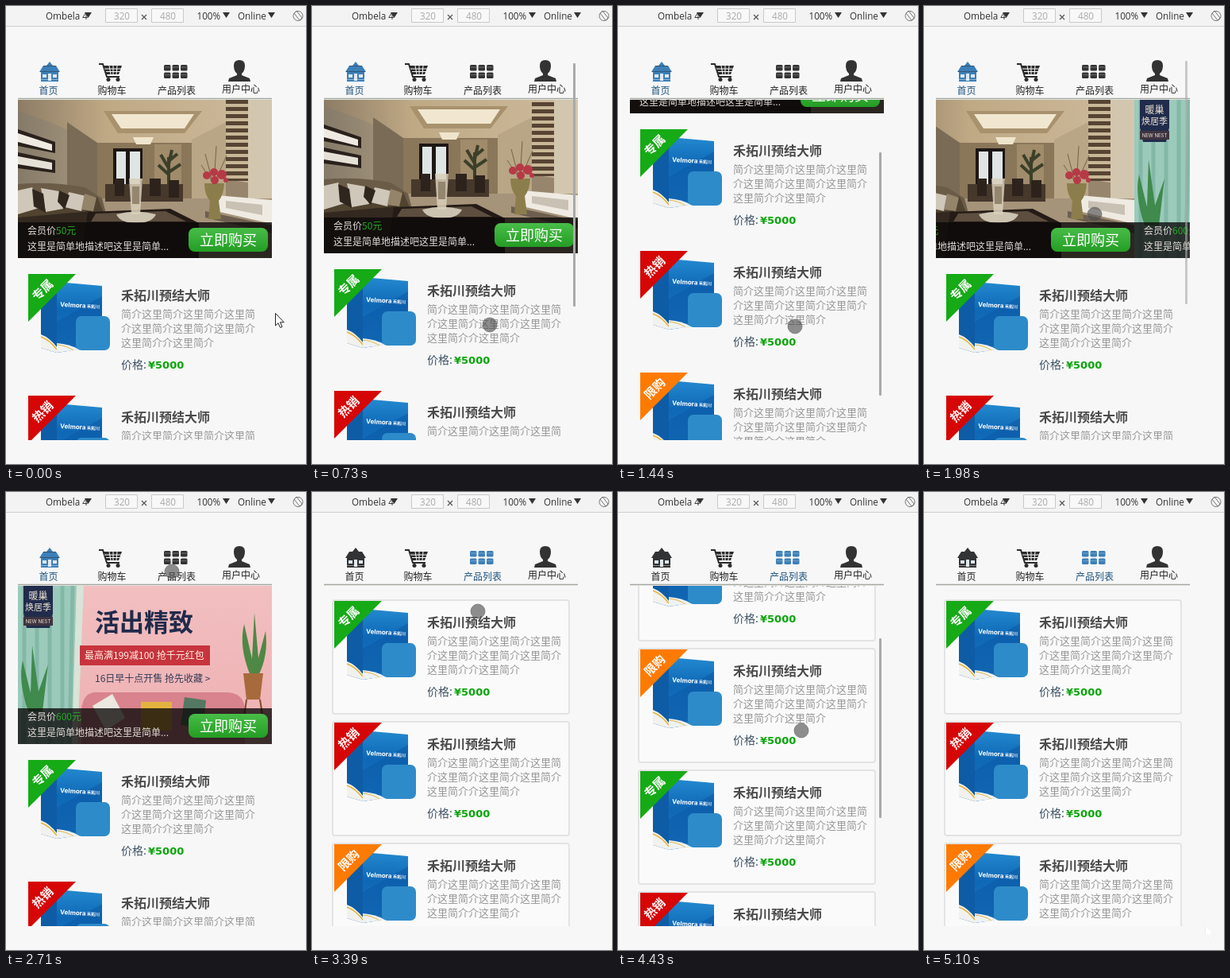
Write an HTML page that moves like this. It is 378 px wide and 576 px high and loops after 5820 ms.

```html
<!DOCTYPE html>
<html lang="zh-CN">
<head>
<meta charset="utf-8">
<title>Mobile shop</title>
<style>
html, body { margin: 0; width: 100%; height: 100%; overflow: hidden; background: #f7f7f7; }
svg { display: block; width: 378px; height: 576px; }
text { font: 12px "Noto Sans CJK SC", "Noto Sans CJK", sans-serif; white-space: pre; }
.tool text { font: 11.7px "Open Sans", "Noto Sans", sans-serif; fill: #333; }
.tool .dim { fill: #aaa; text-anchor: middle; }
.nav text { fill: currentColor; }
.desc { font-size: 13px; fill: #979797; }
.title { font-size: 16px; font-weight: 700; fill: #4a4a4a; }
.price { font-size: 14px; fill: #3c5063; }
.sum { font: bold 13px "DejaVu Sans", sans-serif; fill: #0ba50b; }
.tag { font-size: 15px; font-weight: 700; fill: #fff; text-anchor: middle; }
.cap { fill: #e2dcd8; }
.cost { fill: #22ac22; }
.buy { font-size: 18px; fill: #fff; }

.home, .list, .roll, .feed, .slides, .bar1, .bar2, .touch, .arrow, .off, .on {
  animation: 5820ms step-end infinite;
}
.home { animation-name: home; }
.list { animation-name: list; }
.roll { animation-name: roll; }
.feed { animation-name: feed; }
.slides { animation-name: slides; }
.bar1 { animation-name: bar1; }
.bar2 { animation-name: bar2; }
.touch { animation-name: touch; }
.arrow { animation-name: arrow; }
.off { animation-name: off; }
.on { animation-name: on; }

@keyframes home { 0% { opacity: 1 } 50%, to { opacity: 0 } }
@keyframes list { 0% { opacity: 0 } 50%, to { opacity: 1 } }
@keyframes off { 0% { color: #1d527c; fill: #3c7fb8 } 50%, to { color: #222; fill: #333 } }
@keyframes on { 0% { color: #222; fill: #333 } 50%, to { color: #1d527c; fill: #3c7fb8 } }
@keyframes roll {
  0% { transform: translateY(0) }
  12.54% { transform: translateY(-6px) }
  13.91% { transform: translateY(-45px) }
  14.94% { transform: translateY(-95px) }
  15.8% { transform: translateY(-200px) }
  16.66% { transform: translateY(-273px) }
  21.64% { transform: translateY(-265px) }
  23.19% { transform: translateY(-225px) }
  24.74% { transform: translateY(-182px) }
  25.77% { transform: translateY(-60px) }
  26.63%, to { transform: translateY(0) }
}
@keyframes bar1 {
  0% { opacity: 0; transform: translateY(0) }
  12.54% { opacity: 1; transform: translateY(3px) }
  13.91% { opacity: 1; transform: translateY(29px) }
  14.94% { opacity: 1; transform: translateY(61px) }
  15.8% { opacity: 1; transform: translateY(128px) }
  16.66% { opacity: 1; transform: translateY(174px) }
  21.64% { opacity: 1; transform: translateY(169px) }
  23.19% { opacity: 1; transform: translateY(143px) }
  24.74% { opacity: 1; transform: translateY(115px) }
  25.77% { opacity: 1; transform: translateY(38px) }
  26.63% { opacity: 1; transform: translateY(0) }
  34.02% { opacity: .6; transform: translateY(0) }
  35.05% { opacity: .3; transform: translateY(0) }
  35.91%, to { opacity: 0; transform: translateY(0) }
}
@keyframes slides {
  0% { transform: translateX(0) }
  34.02% { transform: translateX(-70px) }
  35.05% { transform: translateX(-155px) }
  35.91% { transform: translateX(-215px) }
  36.94% { transform: translateX(-262px) }
  37.97% { transform: translateX(-295px) }
  38.83% { transform: translateX(-312px) }
  39.69% { transform: translateX(-318px) }
  40.72%, to { transform: translateX(-320px) }
}
@keyframes feed {
  0% { transform: translateY(0) }
  63.05% { transform: translateY(-12px) }
  64.08% { transform: translateY(-62px) }
  65.12% { transform: translateY(-140px) }
  66.15% { transform: translateY(-230px) }
  67.18% { transform: translateY(-290px) }
  74.22% { transform: translateY(-275px) }
  75.25% { transform: translateY(-245px) }
  76.28% { transform: translateY(-210px) }
  77.31% { transform: translateY(-170px) }
  78.35% { transform: translateY(-125px) }
  79.38% { transform: translateY(-80px) }
  80.58% { transform: translateY(-40px) }
  81.78% { transform: translateY(-12px) }
  82.81%, to { transform: translateY(0) }
}
@keyframes bar2 {
  0% { opacity: 0; transform: translateY(0) }
  63.05% { opacity: 1; transform: translateY(6px) }
  64.08% { opacity: 1; transform: translateY(29px) }
  65.12% { opacity: 1; transform: translateY(66px) }
  66.15% { opacity: 1; transform: translateY(108px) }
  67.18% { opacity: 1; transform: translateY(137px) }
  74.22% { opacity: 1; transform: translateY(130px) }
  75.25% { opacity: 1; transform: translateY(115px) }
  76.28% { opacity: 1; transform: translateY(99px) }
  77.31% { opacity: 1; transform: translateY(80px) }
  78.35% { opacity: 1; transform: translateY(59px) }
  79.38% { opacity: 1; transform: translateY(38px) }
  80.58% { opacity: 1; transform: translateY(19px) }
  81.78% { opacity: 1; transform: translateY(6px) }
  82.81% { opacity: 1; transform: translateY(0) }
  84.87% { opacity: .5; transform: translateY(0) }
  85.73%, to { opacity: 0; transform: translateY(0) }
}
@keyframes touch {
  0% { opacity: 0; transform: translate(315px, 388px) }
  6.52% { opacity: 1; transform: translate(315px, 388px) }
  7.56% { opacity: 1; transform: translate(270px, 391px) }
  8.41% { opacity: 1; transform: translate(235px, 398px) }
  9.45% { opacity: 1; transform: translate(224px, 401px) }
  13.91% { opacity: 1; transform: translate(224px, 362px) }
  14.94% { opacity: 1; transform: translate(224px, 312px) }
  21.64% { opacity: 1; transform: translate(224px, 320px) }
  23.19% { opacity: 1; transform: translate(223px, 360px) }
  24.74% { opacity: 1; transform: translate(223px, 403px) }
  31.61% { opacity: 1; transform: translate(262px, 330px) }
  32.64% { opacity: 1; transform: translate(285px, 264px) }
  34.02% { opacity: 1; transform: translate(215px, 262px) }
  35.05% { opacity: 1; transform: translate(130px, 258px) }
  38.83% { opacity: 1; transform: translate(145px, 225px) }
  39.69% { opacity: 1; transform: translate(172px, 180px) }
  40.72% { opacity: 1; transform: translate(200px, 128px) }
  41.58% { opacity: 1; transform: translate(208px, 101px) }
  42.61% { opacity: 1; transform: translate(211px, 100px) }
  45.7% { opacity: 1; transform: translate(210px, 109px) }
  46.56% { opacity: 1; transform: translate(209px, 100px) }
  58.24% { opacity: 1; transform: translate(209px, 150px) }
  59.27% { opacity: 1; transform: translate(211px, 230px) }
  60.3% { opacity: 1; transform: translate(214px, 310px) }
  61.34% { opacity: 1; transform: translate(216px, 360px) }
  62.19% { opacity: 1; transform: translate(217px, 379px) }
  63.05% { opacity: 1; transform: translate(217px, 367px) }
  64.08% { opacity: 1; transform: translate(217px, 317px) }
  65.12% { opacity: 1; transform: translate(217px, 250px) }
  73.19% { opacity: 1; transform: translate(225px, 255px) }
  74.22% { opacity: 1; transform: translate(228px, 270px) }
  75.25% { opacity: 1; transform: translate(231px, 300px) }
  76.28% { opacity: 1; transform: translate(233px, 335px) }
  77.31% { opacity: 1; transform: translate(235px, 375px) }
  78.35% { opacity: 1; transform: translate(236px, 410px) }
  84.87% { opacity: 1; transform: translate(270px, 460px) }
  85.73% { opacity: 1; transform: translate(310px, 510px) }
  86.76%, to { opacity: 0; transform: translate(310px, 510px) }
}
@keyframes arrow {
  0% { opacity: 1; stroke: #222; transform: translate(339px, 386px) }
  1.03% { opacity: 1; stroke: #222; transform: translate(341px, 384px) }
  6.52% { opacity: 0; stroke: #222; transform: translate(341px, 384px) }
  86.76% { opacity: 1; stroke: #222; transform: translate(345px, 530px) }
  87.62%, to { opacity: 1; stroke: #f1f1f1; transform: translate(354px, 544px) }
}
</style>
</head>
<body>
<svg viewBox="0 0 378 576">
<defs>
  <clipPath id="page"><path d="M15 118h320v428H15z"/></clipPath>
  <clipPath id="phone"><path d="M15 69h320v477H15z"/></clipPath>
  <clipPath id="frame"><path d="M15 118h320v199H15z"/></clipPath>
  <linearGradient id="blue" x2="0" y2="1"><stop stop-color="#2389cf"/><stop offset=".4" stop-color="#0f68b6"/><stop offset="1" stop-color="#1976c2"/></linearGradient>
  <linearGradient id="green" x2="0" y2="1"><stop stop-color="#48bd48"/><stop offset="1" stop-color="#249d24"/></linearGradient>
  <linearGradient id="pink" x2="0" y2="1"><stop stop-color="#f2bfc0"/><stop offset="1" stop-color="#eeb0b3"/></linearGradient>
  <linearGradient id="wall" x2="1"><stop stop-color="#857a69"/><stop offset="1" stop-color="#a8987e"/></linearGradient>
  <linearGradient id="ceiling" x2="1"><stop stop-color="#8d7c65"/><stop offset=".35" stop-color="#bfa985"/><stop offset="1" stop-color="#cdbb9c"/></linearGradient>
  <path id="tri" d="M0 0h9l-4.5 7z" fill="#333"/>
  <path id="corner" d="M28 2h60L28 62z"/>

  <g id="card">
    <path d="M44 20L64 12V101L44 95z" fill="#0f5ca6"/>
    <path d="M44 78q11 4 20 16v7L44 95z" fill="#f1f1ee"/>
    <path d="M44 81q11 4 20 16" fill="none" stroke="#e4b53a" stroke-width="1.5"/>
    <path d="M64 12L121 17V92L64 101z" fill="url(#blue)"/>
    <path d="M64 62L121 30V70L78 99 64 101z" fill="#0b5aa6" opacity=".55"/>
    <path d="M64 89q16 1 28 8L64 101z" fill="#eef2f3"/>
    <path d="M64 91q12 1 21 7" fill="none" stroke="#e4b53a"/>
    <text transform="translate(68 43) rotate(3)" style="font:bold 8px Inter,sans-serif" fill="#fff">Velmora<tspan style="font-size:5.5px" dx="1">禾拓川</tspan></text>
    <rect x="88" y="55" width="43" height="43" rx="7" fill="#2e8bc9"/>
    <text class="title" x="145" y="35">禾拓川预结大师</text>
    <text class="desc" x="145" y="57">简介这里简介这里简介这里简</text>
    <text class="desc" x="145" y="75">介这里简介这里简介这里简介</text>
    <text class="desc" x="145" y="93">这里简介介这里简介</text>
    <text class="price" x="145" y="121">价格:</text>
    <text class="sum" x="179" y="121">¥5000</text>
  </g>
  <g id="green-tag"><use href="#corner" fill="#16aa16"/><text class="tag" transform="translate(50 26) rotate(-45)">专属</text></g>
  <g id="red-tag"><use href="#corner" fill="#d60606"/><text class="tag" transform="translate(50 26) rotate(-45)">热销</text></g>
  <g id="orange-tag"><use href="#corner" fill="#ff7a00"/><text class="tag" transform="translate(50 26) rotate(-45)">限购</text></g>
  <g id="trio">
    <use href="#card"/><use href="#green-tag"/>
    <use href="#card" y="153"/><use href="#red-tag" y="153"/>
    <use href="#card" y="306"/><use href="#orange-tag" y="306"/>
  </g>
  <rect id="edge" x="26" y="1" width="298" height="143" rx="3" fill="#fafafa" stroke="#e3e3e3" stroke-width="2"/>
  <g id="edges"><use href="#edge"/><use href="#edge" y="153"/><use href="#edge" y="306"/></g>

  <g id="caption">
    <path d="M0 154h320v45H0z" fill="#0b0808" opacity=".78"/>
    <text class="cap" x="12" y="189">这里是简单地描述吧这里是简单...</text>
    <rect x="215" y="161" width="100" height="30" rx="8" fill="url(#green)"/>
    <text class="buy" x="229" y="183">立即购买</text>
  </g>

  <g id="room">
    <path d="M0 0h320v199H0z" fill="#97866d"/>
    <path d="M0 0h320L232 54H100L40 28 0 16z" fill="url(#ceiling)"/>
    <path d="M0 14l40 14 60 26v70L0 140z" fill="url(#wall)"/>
    <path d="M62 28l38 26v70H62z" fill="#7a6b57"/>
    <path d="M108 14h124l-22 28h-84z" fill="#a8916d"/>
    <path d="M118 18h104l-12 18h-80z" fill="#f1e7d0"/>
    <path d="M100 54h132v70H100z" fill="#8a7659"/>
    <path d="M172 56h34v60h-34z" fill="#a08b6b"/>
    <path d="M219 50l43-22v100h-43z" fill="#b9a687"/>
    <path d="M262 0h28v104l-28-4z" fill="#c9b797"/>
    <path d="M276 0v102" stroke="#574433" stroke-width="28" stroke-dasharray="5 4"/>
    <path d="M290 0h30v125h-30z" fill="#d3c6af"/>
    <path d="M0 37l47 16v14L0 58z" fill="#2a211c"/>
    <path d="M0 42l43 14v8L0 53z" fill="#eeeae2"/>
    <path d="M0 66l47 10v16L0 86z" fill="#2a211c"/>
    <path d="M0 71l43 8v9L0 81z" fill="#e6e1d7"/>
    <path d="M120 61h37v58h-37z" fill="#1d1714"/>
    <path d="M124 65h12v51h-12zM141 65h13v51h-13z" fill="#dfe5e4"/>
    <path d="M145 47h26l-4 9h-18z" fill="#efe5cc"/>
    <path d="M90 124h230v75H60z" fill="#a5937a"/>
    <path d="M190 112V72m0 22l-13-12m13 4l-10-17m10 8l11-9m-11 23l15-10m-15 0l4-18" stroke="#3c3f29" stroke-width="4" fill="none"/>
    <path d="M110 106h98v22h-98z" fill="#46382b"/>
    <path d="M122 99h12v22h-12zM166 99h14v22h-14zM190 101h13v22h-13z" fill="#2d231c"/>
    <path d="M250 120l70 6v30l-70-16z" fill="#efebe3"/>
    <path d="M262 127l46 5v13l-46-9z" fill="#c9c1b3"/>
    <path d="M236 140l84 18v10l-84-20z" fill="#6d5f4f"/>
    <path d="M0 106q40-4 84 4l22 14 8 30H0z" fill="#6b5c48"/>
    <path d="M0 128l100-6 14 34H0z" fill="#50432f"/>
    <path d="M0 114l18-4 12 25-30 9zM29 111l23 4 5 22-22 4zM64 116l22 5-6 19-21-5z" fill="#cfc7b9"/>
    <path d="M18 112l14 6 3 24-15-8zM52 114l13 6-6 18-9-10z" fill="#2f261e"/>
    <path d="M84 118l15 5-4 17-15-2z" fill="#94846a"/>
    <path d="M0 148l92-8 20 14v45H0z" fill="#332920"/>
    <path d="M88 141l104-4 36 18v44H80z" fill="#241b16"/>
    <path d="M98 143l88-3 26 13H92z" fill="#5d4e3f"/>
    <path d="M124 144q25-7 50 0-5 11-25 11t-25-11z" fill="#cbc2b0"/>
    <path d="M140 99h17l-3 45h-11z" fill="#d9cfba" opacity=".85"/>
    <path d="M144 109h9v22h-9z" fill="#94866f"/>
    <path d="M235 105h25q-1 15-7 22l3 23h-16l2-23q-7-8-7-22z" fill="#8c7d4c"/>
    <path d="M246 106l-10-38m11 38l3-48m-3 48l16-36m-16 36l-16-24" stroke="#72643f" fill="none"/>
    <g fill="#b63a46"><circle cx="238" cy="95" r="5"/><circle cx="247" cy="91" r="5"/><circle cx="257" cy="94" r="6"/><circle cx="248" cy="101" r="5"/><circle cx="262" cy="101" r="3"/></g>
  </g>

  <g id="banner">
    <path d="M0 0h320v199H0z" fill="url(#pink)"/>
    <path d="M0 0h74l-6 199H0z" fill="#9bcabb"/>
    <path d="M8 0v199M24 0v199M40 0v199M56 0v199M69 0l-4 199" stroke="#74ad9a" stroke-width="5" opacity=".6"/>
    <path d="M74 0h9l-8 199h-7z" fill="#d8e4d8"/>
    <path d="M80 156q2-24 22-22h160q23 0 24 22v43H80z" fill="#d8838d"/>
    <path d="M94 151l25-15 16 30-24 16z" fill="#ece7df"/>
    <path d="M155 146h39v36h-39z" fill="#e3b340"/>
    <path d="M210 140l27 4-4 35-28-4z" fill="#557863"/>
    <path d="M13 158Q0 120 6 94l10 41 2-60 8 58 12-34-7 59z" fill="#3f8a4c"/>
    <path d="M293 113q-15-36-8-65l10 44 3-58 5 57 9-34q4 30-9 56z" fill="#4e8844"/>
    <path d="M284 110h25l-4 33h-17z" fill="#a76a3c"/>
    <path d="M288 143l-5 38m22-38l6 38" stroke="#7d4c2d" stroke-width="2"/>
    <path d="M7 0h37v35l-4 18H11L7 35z" fill="#212c4c"/>
    <path d="M7 39h37v11H7z" fill="#3f3440"/>
    <g fill="#eee2d2" text-anchor="middle">
      <text x="25.5" y="17" style="font-size:12px">暖巢</text>
      <text x="25.5" y="31" style="font-size:11px">焕居季</text>
      <text x="25.5" y="47" style="font:6px Inter,sans-serif">NEW NEST</text>
    </g>
    <text x="97" y="57" style="font-size:31px;font-weight:700" fill="#202b4b">活出精致</text>
    <path d="M78 75h164v25H78z" fill="#c7343d"/>
    <text x="84" y="92" fill="#fff3e6">最高满199减100 抢千元红包</text>
    <text x="97" y="121" fill="#343a56">16日早十点开售 抢先收藏 &gt;</text>
  </g>
</defs>

<path d="M0 0h378v576H0z" fill="#f7f7f7"/>

<g clip-path="url(#page)">
  <g class="home"><g class="roll">
    <g clip-path="url(#frame)"><g class="slides">
      <g transform="translate(15 118)">
        <use href="#room"/><use href="#caption"/>
        <text class="cap" x="12" y="169">会员价<tspan class="cost">50元</tspan></text>
      </g>
      <g transform="translate(335 118)">
        <use href="#banner"/><use href="#caption"/>
        <text class="cap" x="12" y="169">会员价<tspan class="cost">600元</tspan></text>
      </g>
    </g></g>
    <use href="#trio" y="335"/>
  </g></g>
  <g class="list"><g class="feed">
    <use href="#edges" y="135"/><use href="#trio" y="135"/>
    <use href="#edges" y="594"/><use href="#trio" y="594"/>
  </g></g>
</g>

<g class="nav">
  <path d="M15 116.5h320" stroke="#a3a8a0" stroke-width="1.4"/>
  <g class="off">
    <path d="M47 75h4l4-5 4 5h4l5 8h-2v12H44V83h-2z"/>
    <path d="M43 82.500h24M47 75.500h16" stroke="#2e3944" opacity=".6"/>
    <path d="M46 86h5v4h-5zM59 86h5v4h-5zM53 85h4v9h-4z" fill="#dfe9f0"/>
    <path d="M44 92.500h22" stroke="#fff" opacity=".4"/>
    <text x="41.5" y="111">首页</text>
  </g>
  <g color="#222" fill="#2b2b2b">
    <path d="M117 73h5l5 16h16" fill="none" stroke="#2b2b2b" stroke-width="2"/>
    <path d="M122 75h24l-4 11h-16z"/>
    <path d="M124 79h21M126 82.500h18M130 75l2 11M135 75v11M140 75l-1 11" stroke="#f7f7f7"/>
    <circle cx="129" cy="92.500" r="2.500"/><circle cx="141" cy="92.500" r="2.500"/>
    <text x="115.500" y="111">购物车</text>
  </g>
  <g class="on">
    <g id="cells"><rect x="199" y="74" width="8.500" height="7.500" rx="1.500"/><rect x="209.500" y="74" width="8.500" height="7.500" rx="1.500"/><rect x="220" y="74" width="8.500" height="7.500" rx="1.500"/></g>
    <use href="#cells" y="9.500"/>
    <path d="M200 77h27.500M200 86.500h27.500" stroke="#fff" stroke-width="1.500" opacity=".2"/>
    <text x="191" y="111">产品列表</text>
  </g>
  <g color="#222" fill="#333">
    <path d="M287 75q0-7 7-7t7 7q0 7-4 10v2l10 4 1 4h-28l1-4 10-4v-2q-4-3-4-10z"/>
    <text x="272" y="109">用户中心</text>
  </g>
</g>

<g clip-path="url(#phone)" fill="#a9a9a9">
  <rect class="bar1" x="329" y="69" width="3" height="306" rx="1"/>
  <rect class="bar2" x="329" y="69" width="3" height="226" rx="1"/>
</g>

<g class="tool">
  <path d="M0 0h378v25H0z" fill="#f3f3f3"/>
  <path d="M0 25.500h378" stroke="#cdcdcd"/>
  <text x="50" y="17">Ombela 4</text>
  <use href="#tri" x="99" y="8"/>
  <path d="M125.500 3.500h40v17h-40zM183.500 3.500h40v17h-40z" fill="#f8f8f8" stroke="#c9c9c9"/>
  <text class="dim" x="146" y="17">320</text>
  <path d="M171 11l6 6m0-6l-6 6" stroke="#555" stroke-width="1.200"/>
  <text class="dim" x="204" y="17">480</text>
  <text x="240.500" y="17">100%</text>
  <use href="#tri" x="273" y="8"/>
  <text x="292" y="17">Online</text>
  <use href="#tri" x="330" y="8"/>
  <g fill="none" stroke="#777"><circle cx="368" cy="12.500" r="6"/><path d="M363 9l3-3 7 9-3 3z"/></g>
</g>

<circle class="touch" r="9" fill="#4a4a4a" fill-opacity=".62" stroke="#6b6b6b" stroke-opacity=".7"/>
<path class="arrow" d="M.5.500v15.500l3.500-3.300 2.600 5.800 2.400-1-2.600-5.700h4.900z" fill="#fff" stroke="#222"/>
</svg>
</body>
</html>
```
